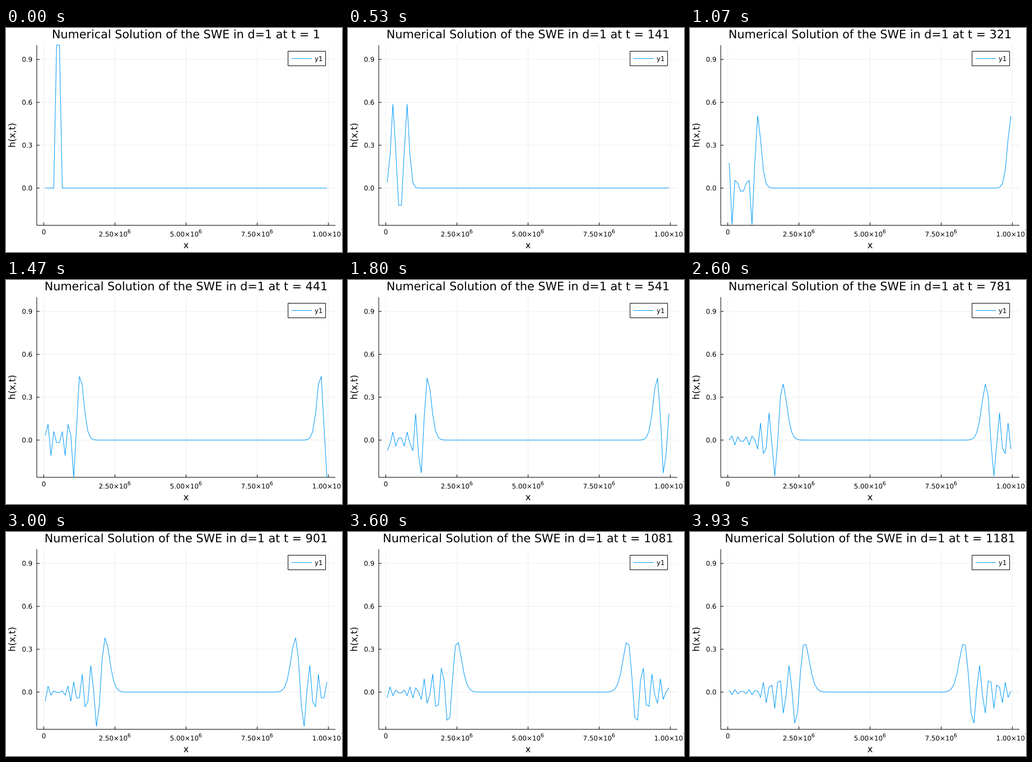
Recreate the animation shown at these times as a matplotlib script. Size 600x400 px, loop 3.99 s.

```python
import numpy as np
import matplotlib.pyplot as plt
from matplotlib.animation import FuncAnimation
from matplotlib.patches import PathPatch, Rectangle
from matplotlib.textpath import TextPath
from matplotlib.transforms import Affine2D

W, H, DPI = 600, 400, 100
FRAMES, LOOP_MS, STRIDE = 60, 3990, 20
PX = 72 / DPI                      # one pixel in points
BLUE, GRID = "#009afa", "#eeeeee"
TITLE, GUIDE, TICK = 20.74, 16.3, 11.85
LEFT, RIGHT, TOP, BOTTOM = 54.95, 588.2, 30.6, 352.3
MID_X, MID_Y = (LEFT + RIGHT) / 2, (TOP + BOTTOM) / 2

# Linear shallow water on a periodic staggered grid
N, DX, DT, G, DEPTH = 100, 1e5, 10.0, 9.81, 4000.0
ASSELIN = 0.1
x = (np.arange(N) + 0.5) * DX


def tendency(s):
    h, u = s
    return np.array([-DEPTH * (u - np.roll(u, 1)),
                     -G * (np.roll(h, -1) - h)]) / DX


def solve(steps):
    """Leapfrog with a Robert-Asselin filter, started by an Euler step."""
    old = np.zeros((2, N))
    old[0, 4:6] = 1
    now = old + DT * tendency(old)
    out = [old[0], now[0]]
    for _ in range(steps - 1):
        new = old + 2 * DT * tendency(now)
        old = now + ASSELIN * (old - 2 * now + new)
        now = new
        out.append(now[0])
    return out


def to_x(v):
    return 67.5 + 5.0814e-5 * v


def to_y(v):
    return 285.9 - 255.3 * v


def text_path(s, px, y, size, align="left", rot=0):
    path = TextPath((0, 0), s, size=size, prop={"family": "DejaVu Sans"})
    box = path.get_extents()
    shift = {"left": 0, "center": 0.5, "right": 1}[align] * (box.x0 + box.x1)
    place = Affine2D().translate(-shift, 0).rotate_deg(rot).scale(1, -1)
    return path.transformed(place.translate(px, y))


fig = plt.figure(figsize=(W / DPI, H / DPI), dpi=DPI, facecolor="white")
ax = fig.add_axes([0, 0, 1, 1])
ax.set(xlim=(0, W), ylim=(H, 0))
ax.axis("off")


def text(*args, **kw):
    patch = PathPatch(text_path(*args, **kw), fc="black", lw=0,
                      snap=False, zorder=6)
    return ax.add_patch(patch)


def line(xs, ys, color="black", z=2):
    return ax.plot(xs, ys, color=color, lw=PX, zorder=z, snap=False,
                   solid_capstyle="butt")[0]


# Axes, grid and tick labels
line([LEFT, LEFT], [TOP, BOTTOM])
line([LEFT, RIGHT], [BOTTOM, BOTTOM])
for v in (0, 0.3, 0.6, 0.9):
    y = to_y(v)
    line([LEFT, RIGHT], [y, y], GRID, 1)
    line([LEFT, LEFT + 5], [y, y])
    text(f"{v:.1f}", 47.2, y + 4.2, TICK, "right")
for v in (0, 2.5e6, 5e6, 7.5e6, 1e7):
    c = to_x(v)
    line([c, c], [TOP, BOTTOM], GRID, 1)
    line([c, c], [BOTTOM, BOTTOM - 5])
    if v == 0:
        text("0", c, 368.4, TICK, "center")
        continue
    power = int(np.log10(v))
    text(f"{v / 10 ** power:.2f}×10", c - 28.9, 372.4, TICK)
    text(str(power), c + 22.3, 366.5, 0.8 * TICK)
text("x", MID_X, 393.2, GUIDE, "center")
text("h(x,t)", 16.4, MID_Y, GUIDE, "center", rot=90)

# Legend
ax.add_patch(Rectangle((503.7, 41.5), 67, 26, fc="white", ec="black",
                       lw=PX, snap=False, zorder=4))
line([509.7, 546.2], [54.5, 54.5], BLUE, 5)
text("y1", 551, 58.9, TICK)

states = solve(STRIDE * (FRAMES - 1))
title = text("1", MID_X, 18.3, TITLE, "center")
wave = line(to_x(x), to_y(states[0]), BLUE, 3)


def draw(i):
    step = STRIDE * i
    label = f"Numerical Solution of the SWE in d=1 at t = {step + 1}"
    title.set_path(text_path(label, MID_X, 18.3, TITLE, "center"))
    wave.set_ydata(to_y(states[step]))
    return title, wave


anim = FuncAnimation(fig, draw, frames=FRAMES, interval=LOOP_MS / FRAMES,
                     repeat=True, repeat_delay=0, blit=False)
plt.show()
```
